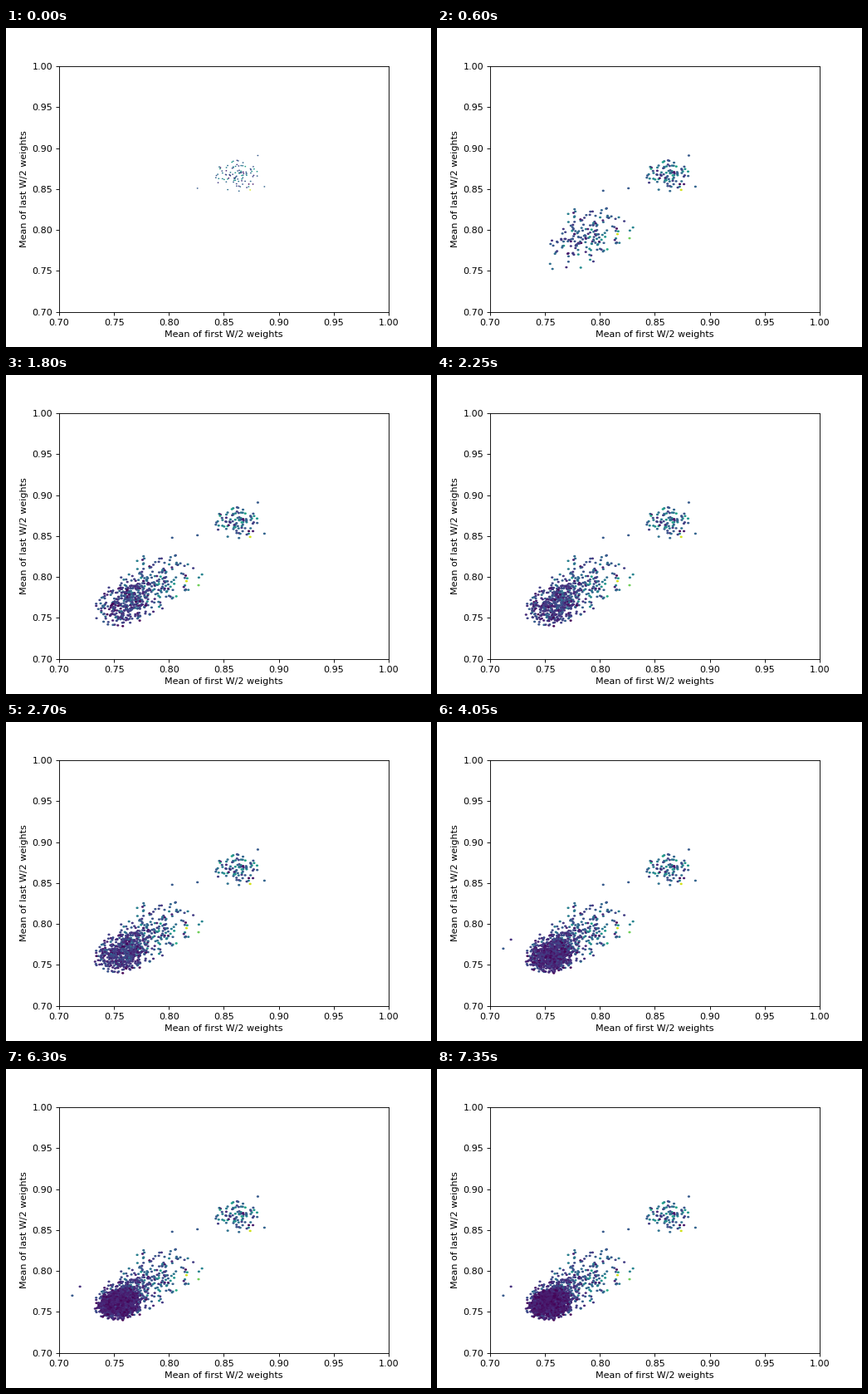
A matplotlib script that plays this animation: 512 px wide and 384 px high, repeating every 7500 ms.

```python
import numpy as np
import matplotlib.pyplot as plt
from matplotlib.animation import FuncAnimation
from matplotlib.path import Path
from matplotlib.transforms import Affine2D

FRAMES, STEP_MS = 50, 150
START, PER_STEP = 92, 45
rng = np.random.default_rng(12)

# Far-out and bright points: x, y, colour value, birth step
KEY = [
    (.826, .851, .28, 0), (.881, .891, .28, 0), (.887, .853, .32, 0),
    (.874, .849, .93, 0), (.803, .848, .28, 2), (.816, .795, .93, 2),
    (.827, .790, .78, 3), (.712, .770, .28, 20), (.719, .781, .14, 22)]


def cloud(n, cx, cy, sd, limit, tilt):
    """Gaussian blob with its tail cut at `limit` deviations."""
    u = rng.random(n)
    r = np.sqrt(-2 * np.log(1 - u * (1 - np.exp(-limit ** 2 / 2))))
    a = rng.uniform(0, 2 * np.pi, n)
    x, y = r * np.cos(a), r * np.sin(a)
    y = tilt * x + np.sqrt(1 - tilt ** 2) * y
    return np.column_stack([cx + sd * x, cy + sd * y])


def generation(k):
    """Points born at step k: each cloud drifts down-left and tightens."""
    if k == 0:
        pts = cloud(START, .8615, .8665, .0095, 2.2, 0)
    else:
        drift, spread = np.exp(-(k - 1) / 4.5), np.exp(-(k - 1) / 12)
        pts = cloud(PER_STEP, .754 + .043 * drift, .760 + .044 * drift,
                    .0077 + .0095 * spread, 2.25, .2)
    fade = np.exp(-k / 18)
    val = rng.normal(.05 + .26 * fade, .03 + .11 * fade, len(pts))
    return np.column_stack([pts, np.clip(val, .01, .68),
                            np.full(len(pts), k)])


data = np.vstack([generation(k) for k in range(FRAMES)] + [KEY])
data = data[np.argsort(data[:, 3], kind="stable")]
xy, val, birth = data[:, :2], data[:, 2], data[:, 3]

fig, ax = plt.subplots(figsize=(6.4, 4.8), dpi=80)
ax.set_xlim(.7, 1)
ax.set_ylim(.7, 1)
ax.set_xlabel("Mean of first W/2 weights")
ax.set_ylabel("Mean of last W/2 weights")
oval = Path.unit_circle().transformed(Affine2D().scale(1, .82))
dots = ax.scatter([], [], c=[], marker=oval, cmap="viridis",
                  vmin=0, vmax=1, linewidths=0)


def draw(k):
    n = np.searchsorted(birth, k, side="right")
    width = 2.9 - 1.2 * np.exp(-k / 1.2)
    dots.set_offsets(xy[:n])
    dots.set_array(val[:n])
    dots.set_sizes([width ** 2])
    return dots,


anim = FuncAnimation(fig, draw, frames=FRAMES, interval=STEP_MS,
                     repeat=True, repeat_delay=0)
plt.show()
```
